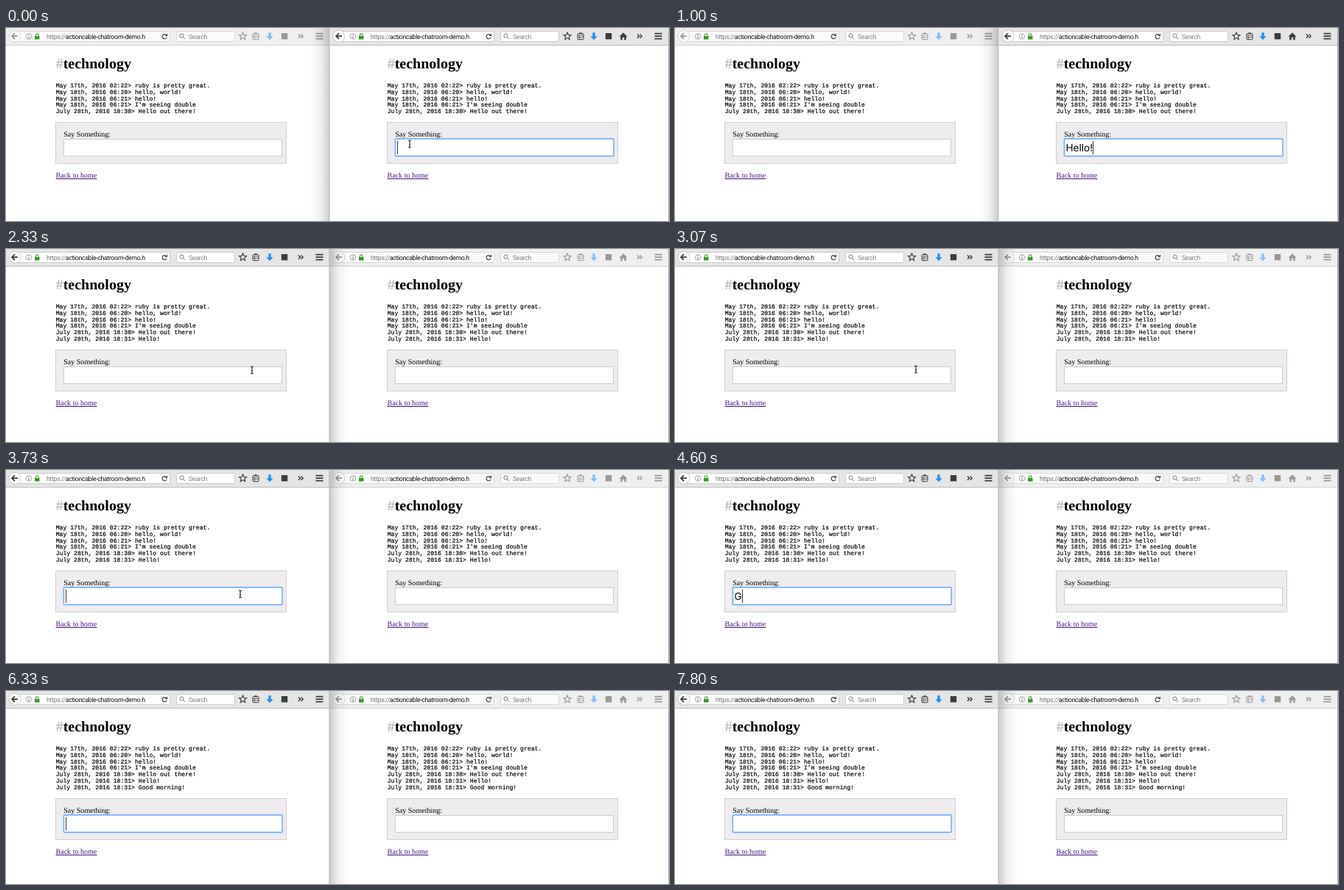
Write an HTML page that moves like this. It is 900 by 263 pixels and loops after 7.87 s.

```html
<!DOCTYPE html>
<html lang="en">
<head>
<meta charset="utf-8">
<title>Chatroom in two windows</title>
<style>
  html, body { margin: 0; width: 100%; height: 100%; overflow: hidden; background: #fff; }
  svg { display: block; width: 900px; height: 263px; }
  text { white-space: pre; text-rendering: geometricPrecision; }
  .page { font: 10.05px "Liberation Serif", serif; }
  .title { font: bold 20px "Liberation Serif", serif; }
  .log { font: 8.13px "Liberation Mono", monospace; stroke: #000; stroke-width: .2px; }
  .field { font: 13.6px Inter, sans-serif; }
  .bar { font: 8.8px Roboto, sans-serif; letter-spacing: -.35px; }
</style>
</head>
<body>
<svg id="stage" viewBox="0 0 900 263"></svg>
<script>
const LOOP = 7870, SPLIT = 439;
const SWITCH = 2270, FOCUS = 3480, BLINK = 500;
const LOG = [
  'May 17th, 2016 02:22> ruby is pretty great.',
  'May 18th, 2016 06:20> hello, world!',
  'May 18th, 2016 06:21> hello!',
  "May 18th, 2016 06:21> I'm seeing double",
  'July 28th, 2016 18:30> Hello out there!'
];
// Each message: first key, time per key, moment of sending.
const TYPED = [
  { text: 'Hello!', start: 400, step: 108, sent: 1130 },
  { text: 'Good morning!', start: 4570, step: 108, sent: 6100 }
];
const MOUSE = [[0, 548, 158], [1700, 548, 158], [2230, 334, 165], [2750, 334, 165],
               [3050, 327, 164], [3250, 327, 164], [3440, 318, 169], [LOOP, 318, 169]];

const pen = document.createElement('canvas').getContext('2d');
pen.font = '13.6px Inter, sans-serif';

const text = (x, y, cls, s, fill = '#000') =>
  `<text x="${x}" y="${y}" class="${cls}" fill="${fill}">${s.replace(/>/g, '&gt;')}</text>`;
const rect = (x, y, w, h, fill, stroke = 'none', extra = '') =>
  `<rect x="${x}" y="${y}" width="${w}" height="${h}" fill="${fill}" stroke="${stroke}" ${extra}/>`;
const line = (d, stroke, width = 1, fill = 'none') =>
  `<path d="${d}" stroke="${stroke}" stroke-width="${width}" fill="${fill}"/>`;
const at = (x, y, body) => `<g transform="translate(${x} ${y})">${body}</g>`;

function star(ink) {
  let d = '';
  for (let i = 0; i < 10; i++) {
    const r = i % 2 ? 2.4 : 5.2, a = i * Math.PI / 5;
    d += `${i ? 'L' : 'M'}${(r * Math.sin(a)).toFixed(2)} ${(-r * Math.cos(a)).toFixed(2)}`;
  }
  return line(d + 'Z', ink, 1.2);
}

const clipboard = ink => rect(-4, -3.5, 8, 8, 'none', ink, 'rx="1"') +
  rect(-1.5, -5, 3, 2, ink) + line('M-4 -1H4M-4 1.5H4M-1.5 -1V4', ink, .7);
const download = ink => line('M-1.7 -5H1.7V0H4.7L0 5L-4.7 0H-1.7Z', 'none', 0, ink);
const badge = ink => rect(-4.2, -4.2, 8.4, 8.4, ink);
const home = ink => line('M0 -5L5.5 .5H3.8V5H1.2V1.5H-1.2V5H-3.8V.5H-5.5Z', 'none', 0, ink);
const more = ink => line('M-3 -2.6L-.5 0L-3 2.6M.6 -2.6L3.1 0L.6 2.6', ink, 1.5);
const menu = ink => line('M-5 -3.5H5M-5 0H5M-5 3.5H5', ink, 1.8);

function toolbar(x, width, active, icons) {
  const ink = active ? '#3c3c3c' : '#999', edge = active ? '#cbcbcb' : '#d8d8d8';
  const blue = active ? '#2490f2' : '#86bff5';
  const field = active ? '#fff' : '#fafafa';
  const painted = icons.map(([icon, px]) => at(px, 11.2, icon(icon === download ? blue : ink)));
  return rect(x, 0, width, 23, active ? '#e5e5e5' : '#efefef') +
    rect(x, 23, width, 1, active ? '#bdbdbd' : '#d4d4d4') +
    at(x, 0,
      rect(14.5, 4.5, 208, 14, field, edge, 'rx="2"') +
      `<circle cx="12" cy="11.2" r="8" fill="${field}" stroke="${edge}"/>` +
      line('M16 11.2H8.5M12 7.2L8 11.2L12 15.2', ink, 1.7) +
      `<circle cx="31" cy="11.5" r="3.7" fill="none" stroke="#888" stroke-width=".8"/>` +
      line('M31 11V14M31 9.3V10.2', '#777') +
      rect(39, 11, 6.5, 4.5, '#3b9a28') + line('M40.5 11V9.5A1.75 1.75 0 0 1 44 9.5V11', '#3b9a28', 1.1) +
      `<svg x="54" y="0" width="135" height="23">` +
      `<text x="1" y="14.6" class="bar" fill="#777">https://<tspan fill="#111">actioncable-chatroom-demo.herokuapp.com</tspan></text></svg>` +
      line('M217.6 9.6A3.1 3.1 0 1 0 218.2 12.6M218.5 7.8V10.5H215.8', '#444', 1.2) +
      rect(231.5, 4.5, 79, 14, field, edge, 'rx="2"') +
      `<circle cx="238.5" cy="10.5" r="2.6" fill="none" stroke="#777"/>` +
      line('M240.5 12.5L243 15', '#777') +
      text(248, 14.6, 'bar', 'Search', '#808080')) +
    painted.join('');
}

function page(x, count, focused, value, caret) {
  const log = LOG.concat(TYPED.map(m => `July 28th, 2016 18:31> ${m.text}`)).slice(0, 5 + count);
  const top = Math.round(128.3 + count * 8.8);
  const caretX = Math.round(13.5 + pen.measureText(value).width);
  const ring = focused
    ? rect(11.5, 23, 296.5, 23.5, '#fff', '#c5def8', 'rx="1.5" stroke-width="2.4"') +
      rect(11.5, 23, 296.5, 23.5, '#fff', '#6eaaf0', 'rx="1" stroke-width="1.4"')
    : rect(11.5, 23.5, 296, 23, '#fff', '#ccc');
  return at(x, 0,
    text(.7, 54.5, 'title', '#', '#bbb') + text(10.7, 54.5, 'title', 'technology') +
    log.map((s, i) => text(.7, (81 + i * 8.8).toFixed(1), 'log', s)).join('') +
    at(0, top,
      rect(.5, .5, 313, 56, '#eeecef', '#cfcdd0') +
      text(11.2, 20, 'page', 'Say Something:') + ring +
      text(13.5, 40, 'field', value) +
      (caret ? rect(caretX, 26, 1, 18, '#333') : '') +
      text(.5, 76, 'page', 'Back to home', '#42157c') +
      rect(.5, 77, 56, 1, '#42157c')));
}

function pointer(t) {
  const hidden = TYPED.some((m, i) => t >= m.start && t < (i ? LOOP : MOUSE[1][0]));
  if (hidden) return '';
  const i = MOUSE.findIndex(p => p[0] > t), [t0, x0, y0] = MOUSE[i - 1], [t1, x1, y1] = MOUSE[i];
  const u = (t - t0) / (t1 - t0), k = u * u * (3 - 2 * u);
  const x = x0 + (x1 - x0) * k, y = y0 + (y1 - y0) * k;
  const overField = (x > 78 && x < 375) || (x > 528 && x < 825);
  return at(x.toFixed(1), y.toFixed(1), overField
    ? line('M-2 -5Q0 -5 0 -3.5Q0 -5 2 -5M0 -3.5V3.5M-2 5Q0 5 0 3.5Q0 5 2 5M-1 1H1', '#222', 1.1)
    : line('M0 0V11L2.6 8.6L4.4 12.6L6 11.9L4.3 8H8Z', '#fff', .8, '#111'));
}

// The active window casts its shadow on the other one.
function shadow(leftActive) {
  const width = 26, x = leftActive ? SPLIT : SPLIT - width;
  const [from, to] = leftActive ? [0, 1] : [1, 0];
  return `<linearGradient id="shade" x1="${from}" x2="${to}"><stop stop-opacity=".2"/>` +
    `<stop offset=".45" stop-opacity=".06"/><stop offset="1" stop-opacity="0"/></linearGradient>` +
    rect(x, 0, width, 263, 'url(#shade)') + rect(SPLIT - .5, 0, 1, 263, '#b4b4b4');
}

function scene(t) {
  const leftActive = t >= SWITCH;
  const count = TYPED.filter(m => t >= m.sent).length;
  const msg = TYPED[leftActive ? 1 : 0];
  const keys = t < msg.start || t >= msg.sent ? 0
    : Math.min(msg.text.length, 1 + Math.floor((t - msg.start) / msg.step));
  const value = msg.text.slice(0, keys);
  const lastKey = t >= msg.sent ? msg.sent
    : keys ? msg.start + (keys - 1) * msg.step
    : leftActive ? FOCUS : 0;
  const caret = Math.floor((t - lastKey) / BLINK) % 2 === 0;
  const leftFocus = t >= FOCUS, rightFocus = !leftActive;
  return rect(0, 0, 900, 263, '#fff') +
    toolbar(0, SPLIT, leftActive, [[star, 321.5], [clipboard, 339], [download, 358],
      [badge, 378], [more, 400], [menu, 425.5]]) +
    toolbar(440, 460, !leftActive, [[star, 762], [clipboard, 780], [download, 798],
      [badge, 818], [home, 838], [more, 860], [menu, 885.5]]) +
    page(67, count, leftFocus, leftFocus ? value : '', leftFocus && caret) +
    page(517, count, rightFocus, rightFocus ? value : '', rightFocus && caret) +
    shadow(leftActive) + rect(899, 0, 1, 263, '#b5b5b5') + pointer(t);
}

const stage = document.getElementById('stage');
const begin = performance.now();
let shown = '';
function frame() {
  const next = scene((performance.now() - begin) % LOOP);
  if (next !== shown) stage.innerHTML = shown = next;
  requestAnimationFrame(frame);
}
frame();
</script>
</body>
</html>
```
